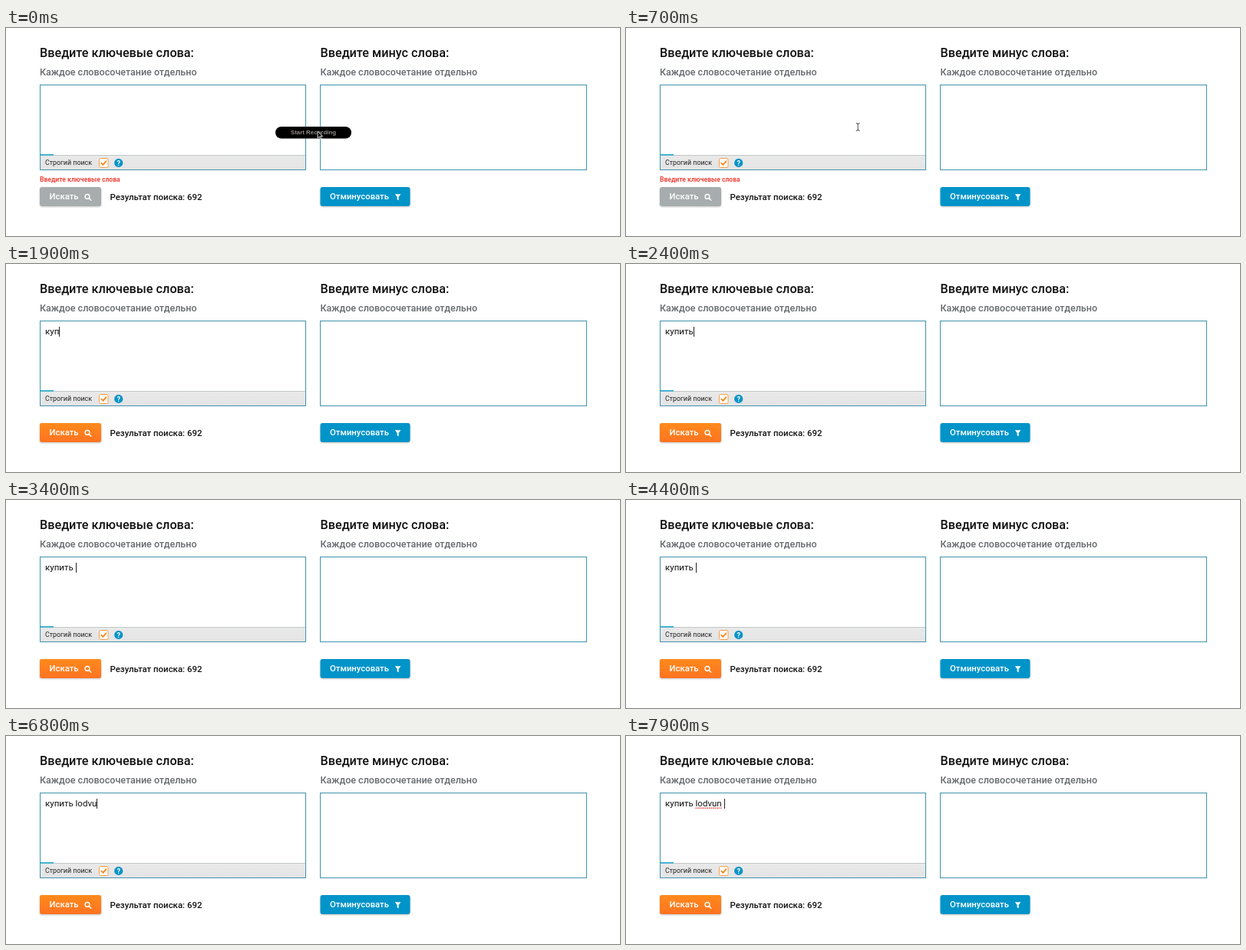
Recreate the animation shown at these times as an HTML page. Size 800 px wide and 272 px high, loop 8 s.

```html
<!DOCTYPE html>
<html lang="ru">
<head>
<meta charset="utf-8">
<title>Поиск по ключевым словам</title>
<style>
  html, body { margin: 0; width: 100%; height: 100%; overflow: hidden; background: #fff; }
  svg { display: block; width: 800px; height: 272px; font-family: Roboto, sans-serif; }
  .head { font-size: 16.2px; font-weight: 500; fill: #111; }
  .sub { font-size: 12.5px; font-weight: 500; fill: #666b6d; }
  .box { fill: #fff; stroke: #3f93ae; }
  .label { font-size: 11.3px; font-weight: 500; fill: #fff; }
  .line { fill: none; stroke-linecap: round; stroke-linejoin: round; }
  #typed { font-size: 11.5px; fill: #111; white-space: pre; }
</style>
</head>
<body>
<svg viewBox="0 0 800 272">
  <defs>
    <linearGradient id="orange" x2="0" y2="1">
      <stop stop-color="#ff8a1c"/><stop offset="1" stop-color="#ff7321"/>
    </linearGradient>
    <linearGradient id="bar" x2="0" y2="1">
      <stop stop-color="#e9e9e9"/><stop offset="1" stop-color="#e4e4e5"/>
    </linearGradient>
    <filter id="shadow" x="-10%" y="-20%" width="120%" height="160%" color-interpolation-filters="sRGB">
      <feDropShadow dx="0" dy="1" stdDeviation="0.8" flood-opacity="0.25"/>
    </filter>
  </defs>

  <text class="head" x="44" y="38">Введите ключевые слова:</text>
  <text class="head" x="409.5" y="38">Введите минус слова:</text>
  <text class="sub" x="44" y="61.5">Каждое словосочетание отдельно</text>
  <text class="sub" x="409.5" y="61.5">Каждое словосочетание отдельно</text>
  <rect class="box" x="44.5" y="74.5" width="346" height="111"/>
  <rect class="box" x="409.5" y="74.5" width="347" height="111"/>

  <rect x="45" y="167" width="345" height="18" fill="url(#bar)"/>
  <path d="M45 166.5H390" stroke="#c4c6c7"/>
  <path d="M44 165.8H62" stroke="#19a9d0" stroke-width="1.5"/>
  <text x="51" y="179" font-size="8.9" fill="#222">Строгий поиск</text>
  <rect x="121.5" y="170.5" width="11.5" height="12" rx="2" fill="#fff" stroke="#f7a048"/>
  <path class="line" d="M124.3 176.6l2.2 2.3 4-4.7" stroke="#f68a1f" stroke-width="1.8"/>
  <circle cx="146.7" cy="176.4" r="5.6" fill="#0794c7"/>
  <text x="146.7" y="179.7" font-size="9" font-weight="700" fill="#fff" text-anchor="middle">?</text>

  <text id="error" x="44" y="200.5" font-size="8.6" font-weight="700" fill="#f0473e">Введите ключевые слова</text>

  <g filter="url(#shadow)">
    <rect x="44" y="208" width="80" height="25" rx="3" fill="#a7adae"/>
    <rect id="active" x="44" y="208" width="80" height="25" rx="3" fill="url(#orange)"/>
    <rect x="409.5" y="208" width="117" height="25" rx="3" fill="#0094c9"/>
  </g>
  <text class="label" x="56.5" y="224">Искать</text>
  <g class="line" stroke="#fff" stroke-width="1.4">
    <circle cx="106" cy="220.4" r="2.9"/><path d="M108.3 222.7l2.5 2.5"/>
  </g>
  <text class="label" x="422" y="224">Отминусовать</text>
  <path d="M506.8 217.3h7.6l-2.8 3.6v4.6l-2-1.5v-3.1z" fill="#fff"/>
  <text x="135.5" y="225" font-size="11.4" font-weight="500" fill="#111">Результат поиска: 692</text>

  <text id="typed" x="51" y="92"></text>
  <path id="spell" stroke="#e5473f" stroke-width="1.5" stroke-dasharray="1.5 1"/>
  <rect id="caret" y="82" width="1" height="13" fill="#222"/>

  <g id="pill">
    <rect x="351" y="129" width="99" height="15.5" rx="7.7"/>
    <text x="400.5" y="139.3" font-family="Liberation Sans, sans-serif" font-size="7.9"
      font-weight="700" fill="#918d8b" text-anchor="middle">Start Recording</text>
  </g>
  <path id="arrow" d="M0 0v9l2.2-2 1.5 3.3 1.5-.7-1.5-3.1h2.9z" fill="#111" stroke="#fff" stroke-width=".8"/>
  <path id="beam" class="line" d="M-2-5q2 0 2 1.5q0-1.5 2-1.5M0-3.5v7M-2 5q2 0 2-1.5q0 1.5 2 1.5" stroke="#333" stroke-width=".9"/>
</svg>
<script>
  const LOOP = 8000, FOCUS = 900, VALID = 1700;
  const PHRASE = "купить lodvun ", WORD_START = 7, WORD_END = 13;
  const KEYS = [1400, 1600, 1800, 2000, 2200, 2300, 2900, 5300, 5800, 6100, 6400, 6700, 7000, 7500];
  const el = id => document.getElementById(id);
  const ids = ["error", "active", "typed", "spell", "caret", "pill", "arrow", "beam"];
  const [error, active, typed, spell, caret, pill, arrow, beam] = ids.map(el);
  const clamp = v => Math.max(0, Math.min(1, v));
  const show = (node, alpha) => node.setAttribute("opacity", Number(alpha));

  function drawPointer(t) {
    const p = clamp((t - 200) / 600), e = p * p * (3 - 2 * p);
    const x = 406 - 112 * e, y = 135 - 6 * e;
    const overBox = x < 391, visible = t < KEYS[0];
    for (const node of [arrow, beam]) node.setAttribute("transform", `translate(${x} ${y})`);
    show(arrow, visible && !overBox);
    show(beam, visible && overBox);
    show(pill, 1 - clamp((t - 100) / 400));
  }

  function drawTyping(t) {
    const count = KEYS.filter(k => t >= k).length;
    typed.textContent = PHRASE.slice(0, count);
    const lastKey = count ? KEYS[count - 1] : FOCUS;
    const width = count ? typed.getSubStringLength(0, count) : 0;
    caret.setAttribute("x", Math.round(51 + width));
    show(caret, t >= FOCUS && (t - lastKey) % 1060 < 530);

    const misspelt = count > WORD_END;
    if (misspelt) {
      const from = 51 + typed.getSubStringLength(0, WORD_START);
      const to = 51 + typed.getSubStringLength(0, WORD_END);
      spell.setAttribute("d", `M${from} 94.3H${to}`);
    }
    show(spell, misspelt);
  }

  function frame(now) {
    const t = now % LOOP;
    drawPointer(t);
    drawTyping(t);
    show(error, t < VALID);
    show(active, clamp((t - VALID) / 200));
    requestAnimationFrame(frame);
  }
  requestAnimationFrame(frame);
</script>
</body>
</html>
```
